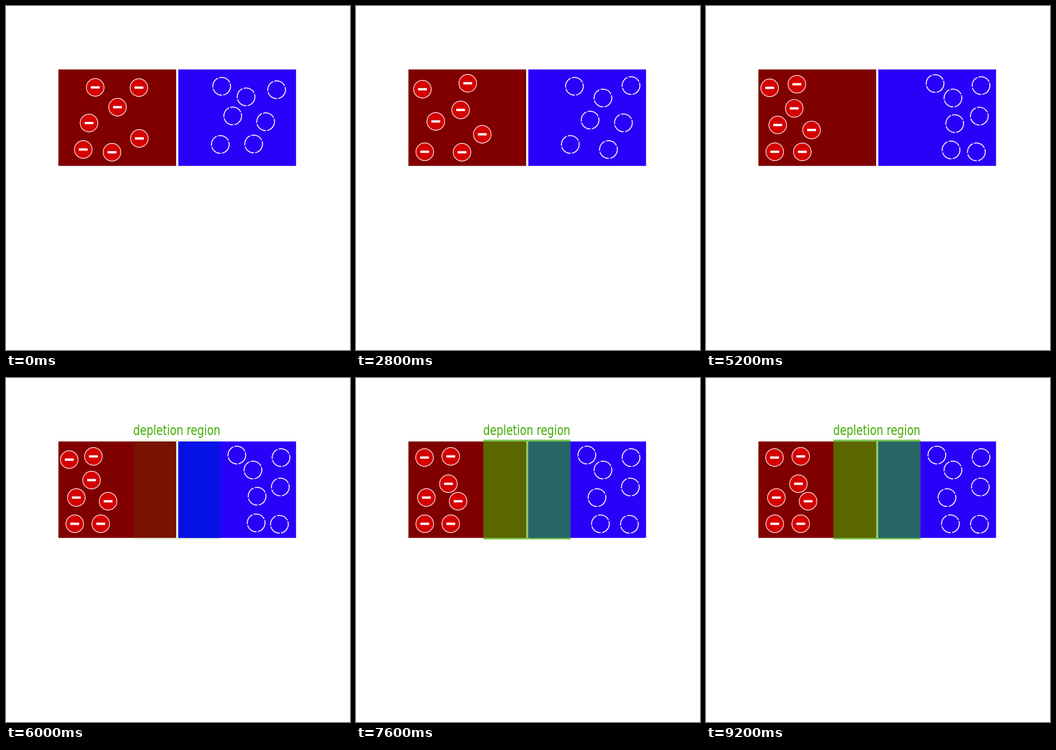
Animation, 748 px wide and 748 px high, one loop 9600 ms. Source, as an HTML page:

```html
<!DOCTYPE html>
<html lang="en">
<head>
<meta charset="utf-8">
<title>Depletion region</title>
<style>
  html, body { margin: 0; width: 100%; height: 100%; overflow: hidden; background: #fff; }
  svg { display: block; width: 100%; height: 100%; }
  text { font: 31px "DejaVu Sans", Verdana, sans-serif; fill: #42ab00; }
</style>
</head>
<body>
<svg viewBox="0 0 748 748">
  <defs>
    <g id="electron">
      <circle r="19.2" fill="#d40000" stroke="#fff" stroke-width="1.4"/>
      <rect x="-9.6" y="-2.5" width="19.2" height="5" fill="#fff"/>
    </g>
    <circle id="hole" r="19.3" fill="none" stroke="#fff" stroke-width="2" pathLength="360"
            stroke-dasharray="98 8 76 8 74 8 80 8" transform="rotate(-18)"/>
  </defs>
  <rect x="114" y="138" width="256" height="209.7" fill="#800000"/>
  <rect x="374.7" y="138" width="256" height="209.7" fill="#2b00f9"/>
  <g id="region">
    <rect x="374.7" y="138" width="91.8" height="209.7" fill="#00f"/>
    <rect id="zone" x="277" y="135" width="189.5" height="215" fill="#42ab00"/>
    <path id="edges" d="M277 135H466.5M277 350H466.5" stroke="#42ab00" stroke-width="2"/>
    <text transform="translate(276.6 124) scale(.748 1)">depletion region</text>
  </g>
  <g id="charges"></g>
</svg>
<script>
const LOOP = 9600, HOLD = 1600, STEP = 400;
const EARLY = 4, DRIFTED = 11, REVEAL = 12, REBOUND = 16, END = 20;
const byId = id => document.getElementById(id);
const clamp01 = v => Math.max(0, Math.min(1, v));
const mix = (a, b, u) => a + (b - a) * u;

// Points of a path: start, early drift, full drift, rebound. A short path stays at its last point.
const paths = {
  electron: [
    "194,177 144.5,181 137.5,177.5 149,173",
    "289,177.5 243,168 190,170.5 206,170.5",
    "242.5,220 227.5,226 186,222 201,230",
    "180.5,254.5 173.5,251 153,260",
    "290,288 274.5,279 222,268",
    "168,312 149.5,317",
    "230.5,318 230.5,318 206,317"
  ],
  hole: [
    "469,174.5 475,174.5 502,167.5",
    "522,197.5 537,200",
    "588.5,182 598,173",
    "493,239 509,248 546,257 524,260",
    "564.5,251.5 581.5,254 596.5,237",
    "466,301 466,301 544,315 531.5,317",
    "538.5,300 549,312 594.5,318"
  ]
};

function makeCharge(kind, path) {
  const node = document.createElementNS("http://www.w3.org/2000/svg", "use");
  node.setAttribute("href", "#" + kind);
  byId("charges").append(node);
  return { node, points: path.split(" ").map(p => p.split(",").map(Number)) };
}
const charges = Object.entries(paths)
  .flatMap(([kind, list]) => list.map(path => makeCharge(kind, path)));

function position({ points }, index, step) {
  const [start, early, drifted = early, rebound = drifted] = points;
  const first = clamp01(step / EARLY);
  const second = clamp01((step - EARLY) / (DRIFTED - EARLY));
  const wobble = 5 * Math.sin(Math.PI * clamp01((step - REBOUND) / (END - REBOUND)));
  const angle = index * 2.4;
  const base = step >= REBOUND
    ? rebound
    : [0, 1].map(axis => mix(mix(start[axis], early[axis], first), drifted[axis], second));
  return [base[0] + wobble * Math.cos(angle), base[1] + wobble * Math.sin(angle)];
}

function regionOpacity(step) {
  if (step < REVEAL) return 0;
  const pulse = step > REBOUND && step < END ? 0.1 : 0;
  return Math.min(0.1 + 0.2 * (step - REVEAL), 0.6) + pulse;
}

function draw(time) {
  const t = time % LOOP;
  const step = Math.max(0, Math.floor((t - HOLD) / STEP) + 1);

  charges.forEach((charge, index) => {
    const [x, y] = position(charge, index, step);
    charge.node.setAttribute("transform", `translate(${x} ${y})`);
  });
  const opacity = regionOpacity(step);
  byId("region").setAttribute("visibility", opacity ? "visible" : "hidden");
  byId("zone").setAttribute("opacity", opacity);
  byId("edges").setAttribute("opacity", opacity);
}

const origin = performance.now();
function tick() {
  draw(performance.now() - origin);
  requestAnimationFrame(tick);
}
tick();
</script>
</body>
</html>
```
